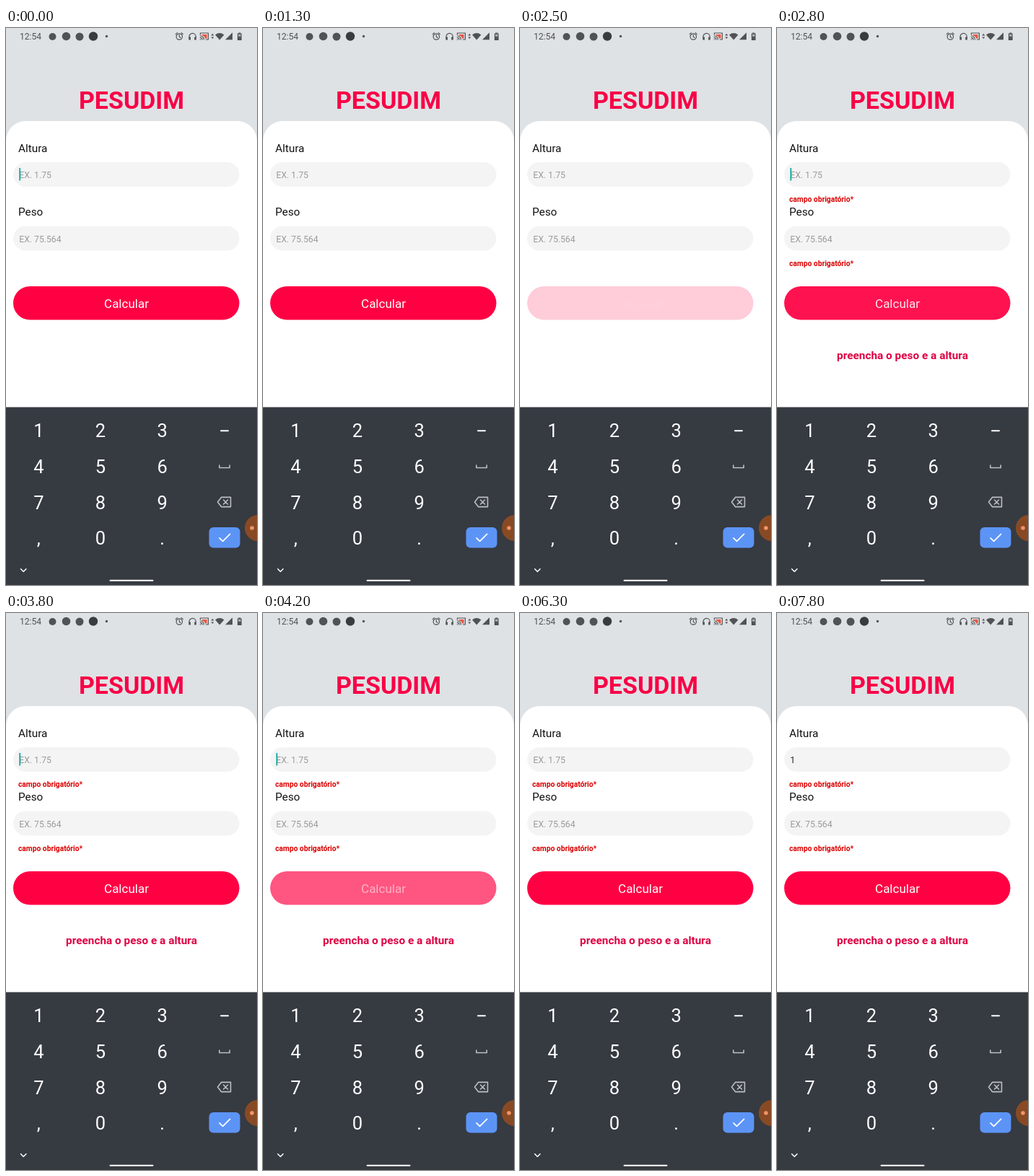
Recreate the animation shown at these times as an HTML page. Size 348 by 772 pixels, loop 8000 ms.

```html
<!DOCTYPE html>
<html lang="pt">
<head>
<meta charset="utf-8">
<style>
  html, body { margin: 0; width: 100%; height: 100%; overflow: hidden; background: #fff; }
  svg { display: block; width: 348px; height: 772px; font-family: Roboto, sans-serif; }
  .label { font-size: 15.3px; fill: #111; }
  .field { font-size: 12.2px; fill: #9b9b9b; }
  .error { font-size: 10.25px; font-weight: 700; fill: #dc0000; }
  .key { font-size: 25.5px; fill: #fff; text-anchor: middle; }
  .line { fill: none; stroke-linecap: round; stroke-linejoin: round; }
</style>
</head>
<body>
<svg viewBox="0 0 348 772">
  <rect width="348" height="200" fill="#dfe2e5"/>

  <g id="status" fill="#505356">
    <text x="19" y="16" font-size="12.1">12:54</text>
    <circle cx="64.5" cy="12" r="5"/>
    <circle cx="83.5" cy="11.5" r="5.8"/>
    <circle cx="102" cy="12" r="5.5"/>
    <circle cx="121" cy="11.5" r="6.2" fill="#393c3f"/>
    <circle cx="139.5" cy="11.5" r="1.7"/>
    <g class="line" stroke="#505356" stroke-width="1.2">
      <circle cx="240.3" cy="12" r="4.2"/>
      <path d="M240.3 9.5v2.8l1.8 1.2M235.2 8.6l2.2-2M245.4 8.6l-2.2-2"/>
      <path d="M254 14v-2a4.6 4.6 0 0 1 9.2 0v2"/>
      <path d="M269.4 9V7h11v9h-3M269.4 15.9h.2M269.4 13.4q2.4.2 2.6 2.6M269.4 11q4.6.2 5 5"/>
    </g>
    <path d="M253.4 12.4h2.6v4h-2.6zM261.2 12.4h2.6v4h-2.6z"/>
    <path d="M271.5 9h7v5.5h-2.4q-1-3.6-4.6-4.2z" fill="#e8543f"/>
    <path d="M286.3 7.8l2 2.6h-4zM286.3 15l2-2.6h-4z"/>
    <path d="M290 9.4q6.2-4.6 12.4 0l-6.2 7.2z"/>
    <path d="M314 6.3v9.9h-10z"/>
    <path d="M322.3 6.4h3v1h1.4v9.6h-5.8V7.4h1.4z"/>
    <path d="M322 8.6h3.6v3.2H322z" fill="#a9adb0"/>
  </g>

  <text x="174" y="112" font-size="34" font-weight="700" fill="#f80046" text-anchor="middle">PESUDIM</text>
  <path d="M0 526V156.500A27.500 27.500 0 0 1 27.500 129H320.500A27.500 27.500 0 0 1 348 156.500V526z" fill="#fff"/>

  <text class="label" x="17" y="171.500">Altura</text>
  <rect x="10" y="186" width="313.500" height="34" rx="17" fill="#f4f4f4"/>
  <text class="field" id="height" x="18.300" y="207.500"></text>
  <rect id="cursor" y="194" width="1.800" height="17.500" fill="#10aaa0"/>

  <text class="label" x="17" y="260.300">Peso</text>
  <rect x="10" y="274.500" width="313.500" height="34" rx="17" fill="#f4f4f4"/>
  <text class="field" x="18.300" y="296.500">EX. 75.564</text>

  <rect id="button" x="10" y="358" width="313.500" height="46.500" rx="23.200" fill="#ff0043"/>
  <text id="caption" x="167" y="388" font-size="17" fill="#fff" text-anchor="middle">Calcular</text>

  <g id="errors">
    <text class="error" x="17" y="241">campo obrigatório*</text>
    <text class="error" x="17" y="329.500">campo obrigatório*</text>
    <text x="174" y="458.500" font-size="15.370" font-weight="700" fill="#de0043" text-anchor="middle">preencha o peso e a altura</text>
  </g>

  <rect y="525.500" width="348" height="246.500" fill="#363a41"/>
  <g id="keys"></g>
  <path class="line" d="M298 558.300h10" stroke="#fff" stroke-width="2" stroke-linecap="butt"/>
  <g class="line" stroke="#bcbfc3" stroke-width="1.600">
    <path d="M295.800 606v3.500h14.400V606"/>
    <path d="M293.500 657l5-6.600h13v13.200h-13zM301.500 654l6 6M307.500 654l-6 6"/>
  </g>
  <rect x="281.500" y="692" width="43" height="28.500" rx="6" fill="#5c94f6"/>
  <path class="line" d="M296 706.800l4.600 4.600 10-10" stroke="#fff" stroke-width="1.700" stroke-linecap="butt"/>
  <circle cx="349" cy="693" r="18" fill="#884a24"/>
  <circle cx="341" cy="693" r="2.800" fill="#f09468"/>
  <path class="line" d="M20.500 749.800l3.700 3.700 3.700-3.700" stroke="#fff" stroke-width="1.500"/>
  <rect x="143.500" y="764.800" width="61" height="2" rx="1" fill="#fff"/>
</svg>
<script>
const LOOP = 8000, STEP = 100;
const ERRORS_AT = 2700, TYPED_AT = 7200, BLINK = 500;
const PRESSES = [
  { down: 2340, up: 2603 },
  { down: 3940, up: 4067 },
];
const $ = id => document.getElementById(id);

$('keys').innerHTML = ['123', '456', '789', ',0.'].map((row, r) =>
  [...row].map((key, c) =>
    `<text class="key" x="${45.3 + c * 85.7}" y="${567.2 + r * 49.7}">${key}</text>`
  ).join('')).join('');

const clamp = u => Math.min(1, Math.max(0, u));
const ease = u => u < 0.5 ? 2 * u * u : 1 - 2 * (1 - u) ** 2;

// Fades towards 0.2 in 150 ms while held, then back to 1 in 250 ms.
function pressOpacity(t, { down, up }) {
  const pressed = 1 - 0.8 * ease(clamp((Math.min(t, up) - down) / 150));
  return pressed + (1 - pressed) * ease(clamp((t - up) / 250));
}

function cursorVisible(t) {
  return t < TYPED_AT ? Math.floor((t + 200) / BLINK) % 2 === 0 : t < 7800;
}

function render(time) {
  const t = Math.floor((time % LOOP) / STEP) * STEP;
  const typed = t >= TYPED_AT;
  const opacity = Math.min(...PRESSES.map(p => pressOpacity(t, p)));

  $('button').setAttribute('opacity', opacity);
  $('caption').setAttribute('opacity', opacity ** 1.5);
  $('errors').setAttribute('visibility', t >= ERRORS_AT ? 'visible' : 'hidden');
  $('height').textContent = typed ? '1' : 'EX. 1.75';
  $('height').style.fill = typed ? '#222' : '';
  $('cursor').setAttribute('x', typed ? 25 : 18.3);
  $('cursor').setAttribute('visibility', cursorVisible(t) ? 'visible' : 'hidden');
}

const start = performance.now();
function tick() {
  render(performance.now() - start);
  requestAnimationFrame(tick);
}
tick();
</script>
</body>
</html>
```
